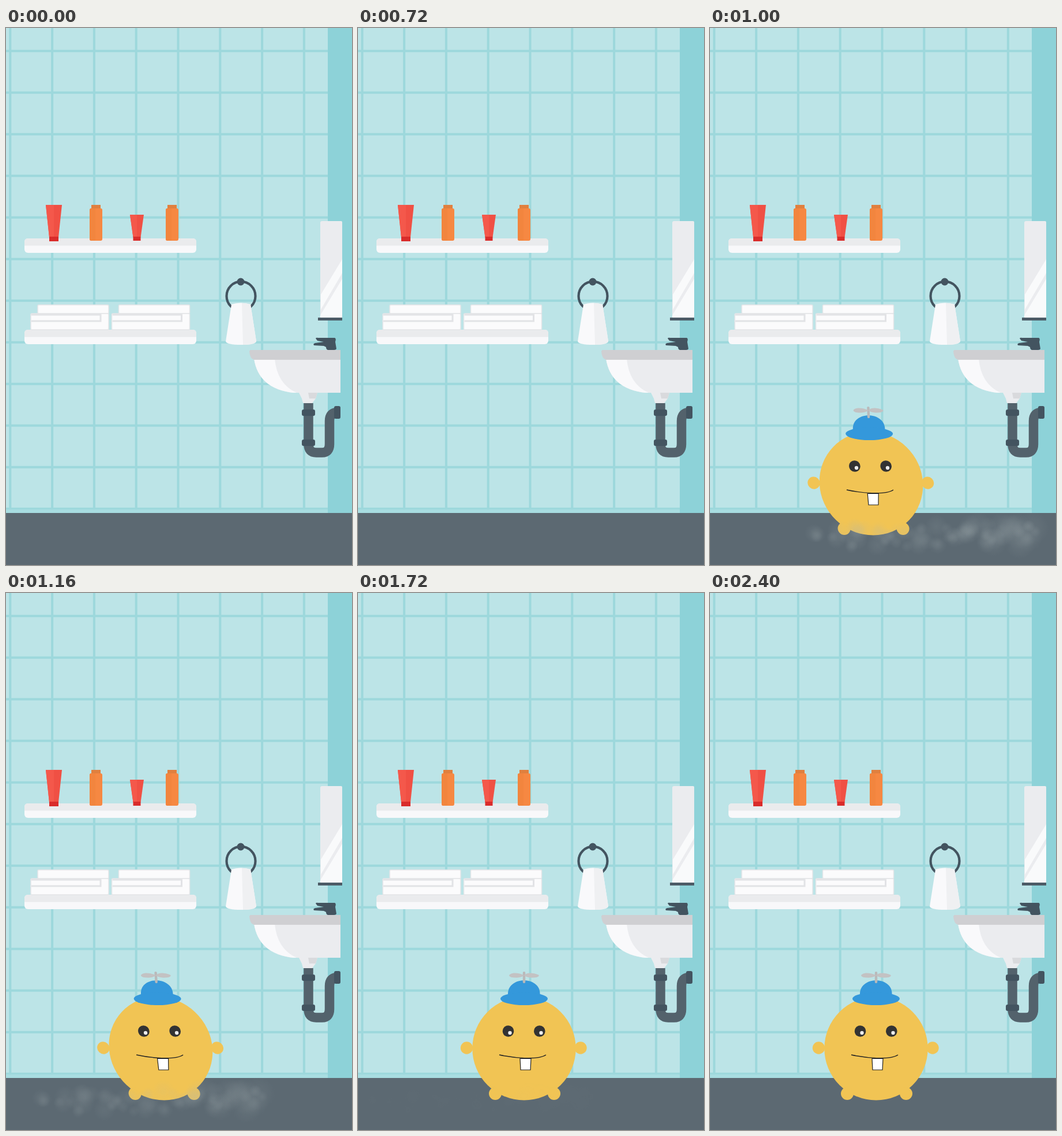
These frames come from a looping animation (600x929 px, 2440 ms). An HTML page:

```html
<!DOCTYPE html>
<html lang="en">
<head>
<meta charset="utf-8">
<title>Bathroom visitor</title>
<style>
  html, body { margin: 0; width: 100%; height: 100%; overflow: hidden; background: #bce4e7; }
  svg { display: block; width: 100%; height: 100%; }
</style>
</head>
<body>
<svg viewBox="0 0 600 929">
  <defs>
    <radialGradient id="puff">
      <stop offset="0" stop-color="#a9b4b6" stop-opacity=".12"/>
      <stop offset=".5" stop-color="#a9b4b6" stop-opacity=".07"/>
      <stop offset="1" stop-color="#a9b4b6" stop-opacity="0"/>
    </radialGradient>
    <g id="bottle">
      <path d="M3 0H19V7H3Z" fill="#e0803f"/>
      <rect y="6" width="22" height="56" rx="3" fill="#f68842"/>
      <path d="M3 6H10V62H3Q0 62 0 59V9Q0 6 3 6Z" fill="#f2853e"/>
    </g>
    <g id="shelf">
      <rect width="298" height="25" rx="6" fill="#f8f8fa"/>
      <path d="M0 12.5V6Q0 0 6 0H292Q298 0 298 6V12.5Z" fill="#eaebed"/>
    </g>
    <g id="towels" stroke="#e4e5e8" stroke-width="1.5">
      <rect x="12" width="123" height="15" rx="2" fill="#fbfbfc"/>
      <rect y="15" width="135" height="28" rx="2" fill="#fbfbfc"/>
      <path d="M1 17H121V28H1" fill="none" stroke="#e2e3e6" stroke-width="3"/>
    </g>
  </defs>

  <rect width="600" height="929" fill="#bce4e7"/>
  <g id="grout" stroke="#9dd8dc" stroke-width="4"></g>
  <path d="M0 833H558V839H0Z" fill="#a8dde1"/>
  <path d="M558 0H600V839H558Z" fill="#8dd2d8"/>
  <path d="M0 839H600V929H0Z" fill="#5c6972"/>

  <use href="#shelf" x="32" y="364"/>
  <use href="#shelf" x="32" y="522"/>
  <use href="#towels" x="43" y="479"/>
  <use href="#towels" x="183.5" y="479"/>

  <path d="M69 306H97L91 362H75Z" fill="#f05044"/>
  <path d="M69 306H83V362H75Z" fill="#f4584b"/>
  <path d="M75 361H91V369H75Z" fill="#d92c2b"/>
  <path d="M215 323H239L233.500 362H220.500Z" fill="#f05044"/>
  <path d="M215 323H227V362H220.500Z" fill="#f4584b"/>
  <path d="M220.500 361H233.500V368H220.500Z" fill="#d92c2b"/>
  <use href="#bottle" x="145" y="306"/>
  <use href="#bottle" x="277" y="306"/>

  <circle cx="407.500" cy="463.700" r="25" fill="none" stroke="#435460" stroke-width="4.200"/>
  <circle cx="407" cy="439" r="6.500" fill="#435460"/>
  <path d="M391 478Q407 473 424 478L434 542Q432 548 407 548Q383 548 381 542Z" fill="#f9f9fb"/>
  <path d="M409 476Q418 476 424 478L434 542Q432 548 411 548Z" fill="#eff0f2"/>

  <path d="M548 334H581Q583 334 583 336V501H545V337Q545 334 548 334Z" fill="#ebecef"/>
  <path d="M583 400V424L546 487V461ZM583 434V501H545V497Z" fill="#f9fafb"/>
  <path d="M541 501H583V506H541Z" fill="#4c5b66"/>

  <path d="M537 537Q538 535 541 536H570Q573 537 571 543L573 555Q572 557 569 557H558Q555 556 555 552L551 550L534 549Q532 546 536 545L551 543L540 541Z" fill="#435460"/>
  <path d="M430 572H580V631H498Q438 624 430 572Z" fill="#ebecef"/>
  <path d="M430 572H466Q470 616 504 631H498Q438 624 430 572Z" fill="#f9f9fb"/>
  <path d="M422 560Q422 557 425 557H580V574H430Q423 572 422 560Z" fill="#cfcfd2"/>
  <path d="M508 631H540L537 641L531 649H515L513 641Z" fill="#ebecef"/>
  <path d="M524 631H540L537 641H526Z" fill="#d9dadd"/>
  <path d="M524.500 649V720Q524.500 734.500 538 734.500H548Q561 734.500 561 720V680Q561 666 573 665" fill="none" stroke="#53626c" stroke-width="16.500"/>
  <g fill="#435460">
    <rect x="513" y="660" width="23" height="11" rx="3"/>
    <rect x="513" y="712" width="23" height="11" rx="3"/>
    <rect x="569" y="654" width="11" height="22" rx="3"/>
  </g>

  <g id="hero">
    <g fill="#f1c454">
      <ellipse cx="288" cy="788" rx="89.700" ry="89.500"/>
      <circle cx="188.500" cy="787" r="10.700"/>
      <circle cx="386" cy="787" r="10.700"/>
      <circle cx="238" cy="866" r="11"/>
      <circle cx="340" cy="866" r="11"/>
    </g>
    <g fill="#3498db">
      <path d="M260 700V692C262 663 314 663 315.500 692V700Z"/>
      <ellipse cx="288" cy="702" rx="41" ry="11"/>
    </g>
    <rect x="285.800" y="655" width="4.400" height="20" rx="2" fill="#b9b9ba"/>
    <path d="M288 661.500Q280 657 270 657.500Q262 659 262 662Q264 666 276 665.500Q284 665 288 661.500Q292 657 300 657.500Q313 659 314 662Q312 666 300 665.500Q292 665 288 661.500Z" fill="#c3c2c3"/>
    <g fill="#333">
      <circle cx="260.500" cy="758" r="9.800"/>
      <circle cx="314.800" cy="758" r="9.800"/>
    </g>
    <g fill="#eee">
      <circle cx="263.500" cy="761" r="3.200"/>
      <circle cx="317.500" cy="761" r="3.200"/>
    </g>
    <path d="M245 799C268 804 311 809 326 799" fill="none" stroke="#222" stroke-width="1.400"/>
    <path d="M281 805.500H300L299 825H282Z" fill="#fff" stroke="#222" stroke-width="1.200"/>
  </g>
  <g id="dust" fill="url(#puff)"></g>
</svg>
<script>
const LOOP = 2440, STEP = 40, BASE = 877;
const $ = id => document.getElementById(id);

function add(parent, tag, attrs) {
  const el = document.createElementNS('http://www.w3.org/2000/svg', tag);
  for (const k in attrs) el.setAttribute(k, attrs[k]);
  parent.append(el);
}

for (let i = 0; i < 8; i++) {
  const x = 7.3 + i * 72.8;
  add($('grout'), 'path', { d: `M${x} 0V839` });
}
for (let i = 0; i < 12; i++) {
  const y = 39.7 + i * 72;
  add($('grout'), 'path', { d: `M0 ${y}H558` });
}

let seed = 17;
const rnd = () => (seed = seed * 16807 % 2147483647) / 2147483647;
for (let i = 0; i < 70; i++) {
  const far = rnd() ** .8;
  add($('dust'), 'circle', {
    cx: 180 + far * 390,
    cy: 883 - far * 8 + (rnd() - .5) * 34,
    r: 9 + rnd() * (9 + far * 12)
  });
}

const linear = p => p;
const out = p => 1 - (1 - p) ** 2;
const swing = p => (1 - Math.cos(Math.PI * p)) / 2;

// Rows: time, value, easing towards this row
const slide = [[740, 440], [1000, -5, out], [1100, -16.5, out], [1320, 0, swing]];
const lean = [[740, -.25], [1000, .039, linear], [1100, .088, out], [1320, -.033, swing],
  [1440, .012, swing], [1560, 0, swing]];
const drift = [[740, 480], [1000, 0, out], [1160, -120, out], [1320, -145, out], [1800, -160, out]];
const haze = [[740, 0], [900, 1, linear], [1000, 1, linear], [1160, .8, linear],
  [1320, .45, linear], [1720, .05, linear], [1840, 0, linear]];

function at(track, t) {
  if (t <= track[0][0]) return track[0][1];
  for (let i = 1; i < track.length; i++) {
    const [t0, a] = track[i - 1], [t1, b, ease] = track[i];
    if (t <= t1) return a + (b - a) * ease((t - t0) / (t1 - t0));
  }
  return track[track.length - 1][1];
}

function draw(t) {
  const k = at(lean, t), x = at(slide, t) - k * BASE;
  $('hero').setAttribute('transform', `matrix(1 0 ${k} 1 ${x} 0)`);
  $('dust').setAttribute('transform', `translate(${at(drift, t)} 0)`);
  $('dust').setAttribute('opacity', at(haze, t));
}

const start = performance.now();
function tick() {
  const t = (performance.now() - start) % LOOP;
  draw(Math.floor(t / STEP) * STEP);
  requestAnimationFrame(tick);
}
tick();
</script>
</body>
</html>
```
